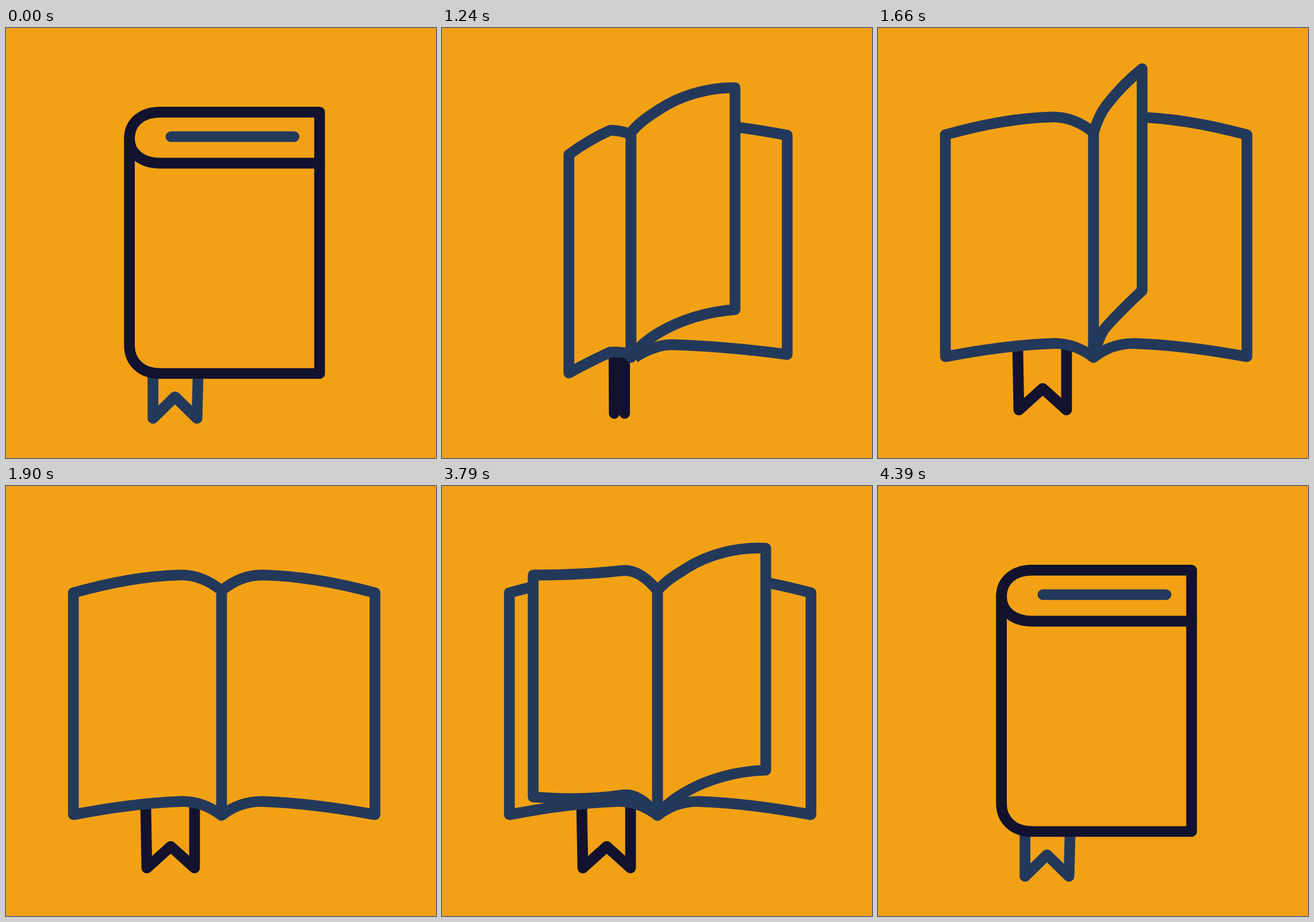
Animation of 748 by 748 pixels, one loop 4.42 s. Source, as an HTML page with a canvas:

```html
<!DOCTYPE html>
<html lang="en">
<head>
<meta charset="utf-8">
<title>Opening book</title>
<style>
  html, body { margin: 0; height: 100%; overflow: hidden; background: #f2a115; }
  canvas { display: block; width: 100%; height: 100%; }
</style>
</head>
<body>
<canvas id="stage" width="748" height="748"></canvas>
<script>
const ctx = document.getElementById('stage').getContext('2d');
const PAPER = '#f2a115', DARK = '#12122f', BLUE = '#23395b';
const LOOP = 4420, STEP = 30, STEPS = 30, OPEN_AT = 1030, CLOSE_AT = 3520;
const SPINE_CLOSED = 214.7, SPINE_OPEN = 375;
const COVER_STEPS = 12.4;

const clamp = (v, lo, hi) => Math.min(hi, Math.max(lo, v));
const lerp = (a, b, k) => a + (b - a) * k;
const between = (p, q, k) => [lerp(p[0], q[0], k), lerp(p[1], q[1], k)];
const raise = (p, h) => [p[0], p[1] - h];
const mix = (a, b, k) => a.map((p, i) => between(p, b[i], k));
const ease = t => { t = clamp(t, 0, 1); return t * t * (3 - 2 * t); };

// An edge is two cubic curves: spine, 2 handles, bend, 2 handles, tip.
// A pose is the top edge followed by the bottom edge.
const TIP = 6, BOTTOM = 7;

// Page edge: a smooth bend near the spine, then an arch of height bow to the tip
function pageEdge(spine, bend, tip, bow) {
  const after = raise(between(bend, tip, 0.28), bow);
  const before = between(bend, after, -0.5);
  const start = raise(between(spine, before, 0.47), 5);
  return [spine, start, before, bend, after, raise(between(bend, tip, 0.64), bow), tip];
}

// Cover edge: a rounded corner, then a straight line to the tip
function cornerEdge(spine, bend, tip, round = 0.6) {
  const corner = [spine[0], bend[1]];
  return [spine, between(spine, corner, round), between(bend, corner, round), bend,
    between(bend, tip, 1 / 3), between(bend, tip, 2 / 3), tip];
}

// A page of the open book; side runs from 1 (right) to -1 (left)
function page(side, spine = SPINE_OPEN) {
  const lift = Math.max(0, 1 - side * side) ** 0.85;
  const bend = [spine + 73 * side, 154.8 - 22 * lift];
  const tip = [spine + 4.5 + 262.3 * side, 185.7 - lift * (115 + 32 * side)];
  const bow = 2 + 5.5 * Math.abs(side) + 45 * lift * side ** 3;
  return [
    ...pageEdge([spine, 182], bend, tip, bow),
    ...pageEdge([spine, 573], raise(bend, 10 * lift - 394), raise(tip, -386), bow - 3)
  ];
}

const rightRest = page(1), leftRest = page(-1);

// The closed book
const shoulder = [SPINE_CLOSED, 192];
const base = cornerEdge([SPINE_CLOSED, 552], [268, 601], [545.5, 601]);
const backClosed = [...cornerEdge(shoulder, [268, 146.3], [545.5, 146.3]), ...base];
const frontClosed = [...cornerEdge(shoulder, [268, 235.2], [545.5, 235.2]), ...base];
const innerTop = cornerEdge([236, 206], [280, 186], [498.5, 188.5], 0);
const innerClosed = [...innerTop, ...innerTop.map(p => raise(p, -370))];

// Start step and number of steps of each turning page
const turns = [[5.23, 10.8], [10.4, 11.6], [16.8, 13.1]];

function topEdge(p) {
  ctx.beginPath();
  ctx.moveTo(...p[0]);
  ctx.bezierCurveTo(...p[1], ...p[2], ...p[3]);
  ctx.bezierCurveTo(...p[4], ...p[5], ...p[TIP]);
}

function stroke(color, cap = 'round') {
  ctx.strokeStyle = color;
  ctx.lineCap = cap;
  ctx.stroke();
}

function drawLeaf(pose, color, closed = true) {
  const b = pose.slice(BOTTOM);
  topEdge(pose);
  ctx.lineTo(...b[TIP]);
  ctx.bezierCurveTo(...b[5], ...b[4], ...b[3]);
  ctx.bezierCurveTo(...b[2], ...b[1], ...b[0]);
  if (closed) ctx.closePath();
  ctx.fill();
  stroke(color, closed ? 'round' : 'butt');
}

function polyline(points, color) {
  ctx.beginPath();
  for (const p of points) ctx.lineTo(...p);
  stroke(color);
}

function drawBookmark(step, spine) {
  const k = ease((step - 1.2) / 12.1);
  const near = spine + lerp(41, -47, k), far = spine + lerp(117.5, -130, k);
  const flare = lerp(2, -2, k);
  const top = lerp(600, 555, k), bottom = lerp(679, 664.5, k);
  polyline([[near, top], [near, bottom], [(near + far) / 2, bottom - 37.5],
    [far, bottom], [far + flare, top]], k < 0.5 ? BLUE : DARK);
}

// The free edge of a cover dips and leads while it swings
const swing = u => 88 * Math.sin(Math.PI * u) * (1 - u);

function drawBack(u) {
  if (u > 0) drawLeaf(mix(innerClosed, rightRest, u), BLUE, false);
  else polyline([[287, 189], [501, 189]], BLUE);
  if (u >= 0.5) return;
  const back = mix(backClosed, rightRest, u);
  back[TIP] = raise(back[TIP], -0.35 * swing(u));
  const [x, y] = back[TIP];
  if (u > 0) polyline([[x, lerp(289, 185, u)], [x, lerp(522, 571, u)]], BLUE);
  topEdge(back);
  ctx.lineTo(x, y + 86);
  stroke(DARK);
}

function coverPose(u) {
  const s = swing(u);
  // handles and tips beyond the bend follow the swing
  const share = i => Math.max(0, i % BOTTOM - 3) / 3;
  return mix(frontClosed, leftRest, u)
    .map(([x, y], i) => [x - s * share(i), y + s * share(i)]);
}

function draw(step) {
  ctx.fillStyle = PAPER;
  ctx.fillRect(0, 0, 748, 748);
  ctx.lineWidth = 18.7;
  ctx.lineJoin = 'round';

  const u = ease(step / COVER_STEPS);
  const spine = lerp(SPINE_CLOSED, SPINE_OPEN, u);
  drawBookmark(step, spine);
  drawBack(u);

  const onLeft = pose => pose[TIP][0] < spine;
  const cover = coverPose(u);
  const leaves = [{ pose: cover, color: onLeft(cover) ? BLUE : DARK }];
  for (const [start, length] of turns) {
    const k = ease((step - start) / length);
    if (k > 0 && k < 1) leaves.push({ pose: page(1 - 2 * k, spine), color: BLUE });
  }
  // leaves stack upwards on the left and downwards on the right
  const left = leaves.filter(l => onLeft(l.pose));
  const right = leaves.filter(l => !onLeft(l.pose)).reverse();
  for (const l of [...left, ...right]) drawLeaf(l.pose, l.color);
}

const stepsSince = (t, start) => clamp(Math.floor((t - start) / STEP) + 1, 0, STEPS);
const origin = performance.now();

function frame() {
  const t = (performance.now() - origin) % LOOP;
  draw(stepsSince(t, OPEN_AT) - stepsSince(t, CLOSE_AT));
  requestAnimationFrame(frame);
}
frame();
</script>
</body>
</html>
```
